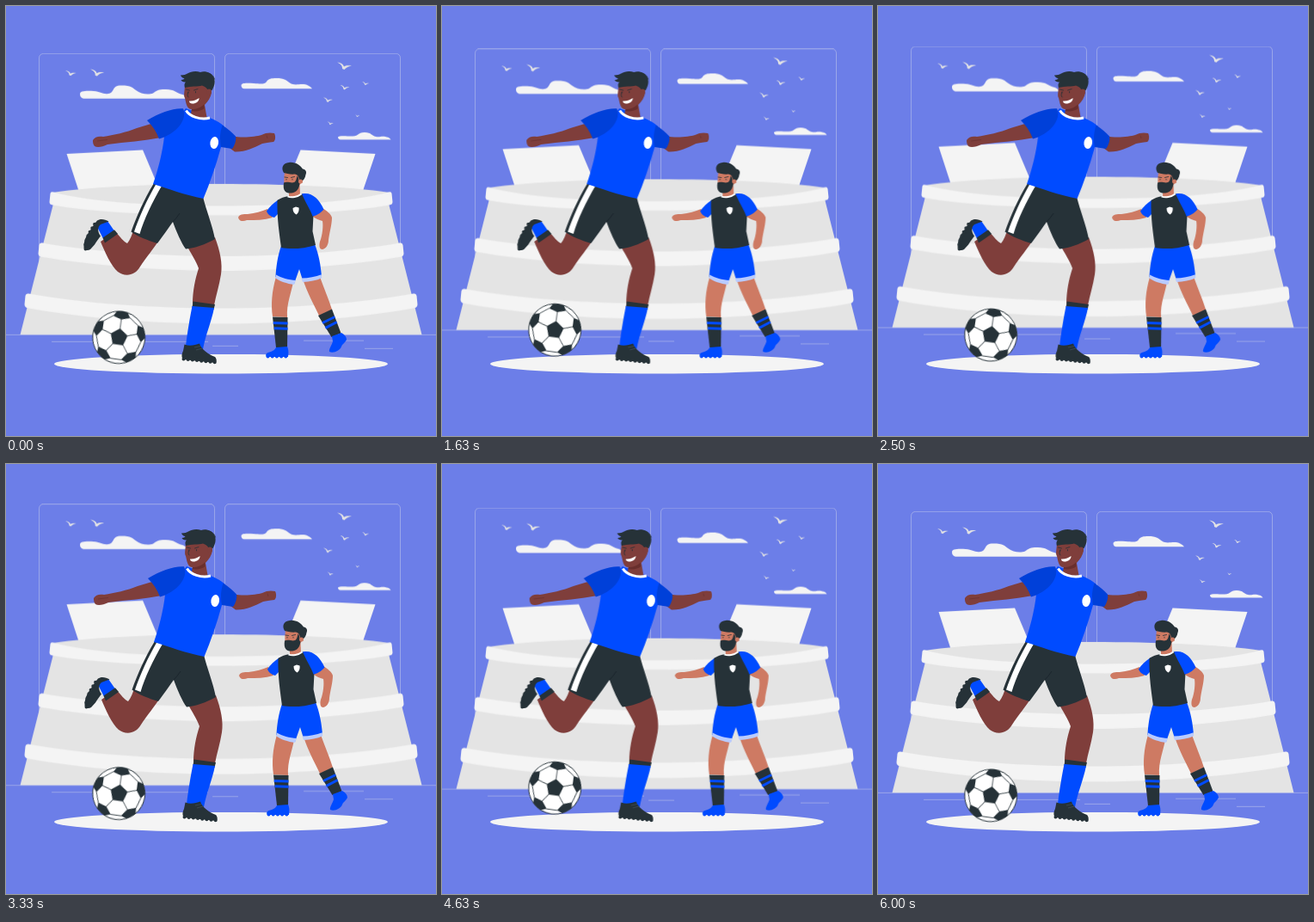
Write an HTML page that moves like this. It is 500x500 px and loops after 6040 ms.

```html
<!DOCTYPE html>
<html lang="en">
<head>
<meta charset="utf-8">
<title>Football match</title>
<style>
  html, body { margin: 0; width: 100%; height: 100%; overflow: hidden; background: #6c7ee8; }
  svg { display: block; width: 100%; height: 100%; }

  .float  { animation: float 6.04s linear infinite; }
  .bounce { animation: bounce 6.04s linear infinite; }
  .shake  { animation: shake 6.04s linear infinite; }

  @keyframes float {
    0%, 100% { transform: translateY(-.13px); }
    49.01%   { transform: translateY(-10px); }
    98.68%   { transform: translateY(0); }
  }
  @keyframes bounce {
    0%, 100%       { transform: translateY(-.27px); }
    24.17%, 73.84% { transform: translateY(-10px); }
    49.01%, 98.68% { transform: translateY(0); }
  }
  @keyframes shake {
    0%, 98.68%, 100%       { transform: translateX(0); }
    9.27%, 88.74%          { transform: translateX(-1px); }
    19.21%, 78.81%         { transform: translateX(2px); }
    29.14%, 49.01%, 68.87% { transform: translateX(-4px); }
    39.07%, 58.94%         { transform: translateX(4px); }
  }

  .white { fill: #fff; }
  .pale  { fill: #f4f4f4; }
  .grey  { fill: #e4e4e4; }
  .ink   { fill: #263238; }
  .blue  { fill: #004bff; }
  .shade { fill: #0040d9; }
  .hem   { fill: #b9cbff; }
  .brown { fill: #7f3e3b; }
  .tan   { fill: #ce7a63; }
  .line  { fill: none; stroke: #ebebeb; stroke-width: .5; stroke-opacity: .75; }
  .studs { fill: none; stroke-width: 4; stroke-linecap: round; stroke-dasharray: 0 5.2; }
  .thin  { fill: none; stroke: #263238; stroke-width: .8; stroke-linecap: round; }
</style>
</head>
<body>
<svg viewBox="0 0 500 500">
  <defs>
    <path id="bird" class="grey" d="M0 0C4 .5 7 2 8 5C10 3.5 13 3.5 17 4C13 5 10.5 6 8.5 8.5C7.5 8 6.5 8 6 7.5C6.3 4 4 2 0 0Z"/>
    <g id="panel">
      <path class="thin" d="M0-10.4V-21M9.95-24.1L19.9-16.9"/>
      <path class="ink" d="M0-21L9.95-24.1L6.1-30L0-30.4L-6.1-30L-9.95-24.1Z"/>
    </g>
  </defs>

  <!-- Sky, stadium and pitch lines -->
  <g class="float">
    <g class="line">
      <rect x="38.5" y="55.4" width="204" height="300" rx="5"/>
      <rect x="254.5" y="55.4" width="204" height="300" rx="5"/>
    </g>
    <g class="pale">
      <path d="M86 103C85.500 98.500 93 98.700 102 99C110 99.500 112 103 119 102C127 101 122 92.500 134 92.500C146 92.500 147 95 151 98C157 103 166 103.500 171 101.500C175 98 179 96.700 186 97C196 97 197 101 205 103C209 104 211 107.700 211 107.700H90C87 107 86 105 86 103Z"/>
      <path d="M273.500 92.500C273.500 89 280 89.500 288 90C297 90.800 301 91 303 88C305 84.500 309 84 314 84C324 84 326 86.500 330 89.500C334 92.500 340 91 344 91C350 91 353 93 356 96.300H277C275 96 273.500 95 273.500 92.500Z"/>
      <path d="M386 152.500C387 150.500 395 151.200 402 151.500C411 152 408 147 417 147C425 147 425 151 430 152C435 153 436 151 441 152C446 153 447 154.500 447.500 155.500H389Q386 155 386 152.500Z"/>
    </g>
    <use href="#bird" transform="translate(69 75) scale(.74)"/>
    <use href="#bird" transform="translate(98 73.500) scale(.95)"/>
    <use href="#bird" transform="translate(385 65.500)"/>
    <use href="#bird" transform="translate(388.500 92) scale(.64)"/>
    <use href="#bird" transform="translate(414 88) scale(.48)"/>
    <use href="#bird" transform="translate(369 106.500) scale(.64)"/>
    <use href="#bird" transform="translate(373.500 134.500) scale(.43)"/>
    <use href="#bird" transform="translate(406 126.500) scale(.3)"/>

    <path class="pale" d="M70.500 172L159 167.400L179 215H84.500ZM342.500 167.400L429.500 172L415 215H323Z"/>
    <path class="grey" d="M54 217C100 210 180 207 250 207S400 210 446 217L445 230L483.500 382.300H16.500L55 230Z"/>
    <g class="pale">
      <path d="M55 216.500C100 229 180 232.500 250 232.500S400 229 445 216.500Q448 215.500 448.500 218L449.500 228Q449.500 231 446 231.500C400 240 320 243.500 250 243.500S100 240 54 231.500Q50.500 231 50.500 228L51.500 218Q52 215.500 55 216.500Z"/>
      <path d="M42 275.500C100 286 180 291 250 291S400 286 458 275.500Q461 275 461.500 278L462.500 288Q462.500 291 459 291.800C400 302 320 308 250 308S100 302 41 291.800Q37.500 291 37.500 288L38.500 278Q39 275 42 275.500Z"/>
      <path d="M26 334.500C90 346 170 351.500 250 351.500S410 346 474 334.500Q477 334 477.500 337L478.500 347Q478.500 350.500 475 351.200C410 363 330 369.500 250 369.500S90 363 25 351.200Q21.500 350.500 21.500 347L22.500 337Q23 334 26 334.500Z"/>
    </g>
    <path class="line" d="M0 382.400H500M53 390.400H235M240 395.400H270M346 389.200H416M417 398.400H450"/>
  </g>

  <ellipse class="pale" cx="250" cy="416.200" rx="194" ry="11.300"/>

  <!-- Ball -->
  <g class="bounce">
    <g transform="translate(131.200 385.600) rotate(8)">
      <circle class="white" r="30.400" stroke="#263238"/>
      <path class="ink" d="M0-10.400L9.900-3.200L6.100 8.400H-6.100L-9.900-3.200Z"/>
      <use href="#panel"/>
      <use href="#panel" transform="rotate(72)"/>
      <use href="#panel" transform="rotate(144)"/>
      <use href="#panel" transform="rotate(216)"/>
      <use href="#panel" transform="rotate(288)"/>
    </g>
  </g>

  <!-- Bearded player -->
  <g class="shake">
    <path class="tan" d="M356 244L368 235C373 238 378 242 379 246C379 254 376 264 375 272C375 278 372 282 368 283C364 283 364 278 365 274C368 266 369 256 368 250C364 249 359 247 356 244Z"/>
    <path class="tan" d="M345 317L365 315C370 329 375 340 379 353L364 360C358 347 350 333 345 317Z"/>
    <path class="ink" d="M363 360L379 352.500L389.500 380.500L378.500 385Z"/>
    <path d="M368 368.500L382.300 361.500M371.500 374.300L384.600 367.500" stroke="#004bff" stroke-width="3"/>
    <path class="blue" d="M379 384L390 380C394 382 396 385 396 388C394 392 391 393 390 396C388 401 381 404 376 402C375 399 379 394 380 390Z"/>
    <path class="tan" d="M314 315L334 320C332 334 326 345 327 362L310 361C308 347 309 332 314 315Z"/>
    <path class="ink" d="M310 361.500L327.500 362L327 398L314 397Z"/>
    <path d="M310.800 368.500L327.500 369M311.800 374.700L327.500 375.200" stroke="#004bff" stroke-width="3"/>
    <path class="blue" d="M314 397L327 396C329 400 328.500 405 328 408H303C301 405 303 403 308 402C311 401 313 399 314 397Z"/>
    <path class="studs" stroke="#004bff" stroke-width="3" d="M304.500 407.500H328"/>
    <path class="blue" d="M320 279L359 277C364 290 366 302 367 314.500C360 318 352 319 345 319L341 306L335 323C327 322 318 319 313.500 315C314 304 316 290 320 279Z"/>
    <path class="hem" d="M314 312.500C320 316 329 318.500 337 319L335 324C327 323 318 320 313.500 316.500ZM343.500 316.500C352 316.500 360 315 366.800 312.300L367.200 316.300C361 319 353 321 345 321Z"/>

    <path class="tan" d="M270 246C271 242 276 242 281 242C290 241 297 239 304 236L310 246C300 249 290 249 280 249C276 251 271 250.500 270 246Z"/>
    <path class="blue" d="M317 225C311 229 306 234 303 238.500C304 242 308 245 312 246L318 240Z"/>
    <path class="ink" d="M329 221L345 218.500L357.500 243L356.500 262L360 278C346 282.500 330 283 320 281C318 265 315 248 315.500 226Q321 222 329 221Z"/>
    <path class="blue" d="M344 218.500C355 216 364 224 369.500 236.500C366 241 360 244 356.500 244.500C354 237 348 228 344 218.500Z"/>
    <path class="white" d="M333.500 235L337 233.500L340.500 234.500C341 239 339.500 241 337.500 242.500C335 241 333.500 239 333.500 235Z"/>

    <path class="tan" d="M324 193L339 194L344 205L341.500 208L342 219C338 223 332 223 329 221L329 216C322 213 323 202 324 193Z"/>
    <path d="M327.500 221.300C332 223.500 339 222 343.500 218.500" fill="none" stroke="#fff" stroke-width="2"/>
    <path class="ink" d="M323 205.500C327 203.500 332 206.500 335 205C338 204 337.500 199 339 197L341.500 206C341 212 338 217 332 217.500C326 218 321.500 216 323 205.500Z"/>
    <path class="ink" d="M323 194C319.500 188 322 182.500 329 182C336 181 342 185 345 189.500C348.500 190 350 193 348.500 196C348 200 346 203 342.500 205L340.500 200C340 197 338 196 336 195.500C331 196 326 195 323 194Z"/>
    <circle class="tan" cx="342.500" cy="204" r="2.500"/>
    <path class="thin" d="M324 199L327.500 199.500M331.500 199.500L335.500 198.500M326 201.300V202M333 201.300V202"/>
  </g>

  <!-- Kicking player -->
  <g class="shake">
    <g class="brown">
      <path d="M148 260L178 272C172 282 163 292 156 303C150 314 138 315 130 309C122 302 115 286 110 274L127 262C132 268 138 275 141 276C144 272 147 266 148 260Z"/>
      <path d="M210 278L243 269C249 285 252 300 250 312C248 325 244 337 242 348L217 346C217 332 220 317 224 305C221 296 215 288 210 278Z"/>
    </g>
    <path class="blue" d="M105 255L118 250L126 261.500L113 270.500Z"/>
    <path class="ink" d="M112.500 269.500L126 260.300L130 265L115 275.500Z"/>
    <path class="ink" d="M119.500 250.500C115 247.500 109 247 106 249.500C102 254 99 260 95 265C92 270 90 275 90.500 281C91 284 95 285 98 283L103 277.500C105 274 107.500 271 110 267.500C106 262 106.500 257 110 254Z"/>
    <path class="studs" stroke="#263238" d="M92.500 282.500C91 274 97 262 105.500 250.500"/>
    <path class="ink" d="M217.500 343.500L243 347L241.500 353L216.500 350.500Z"/>
    <path class="blue" d="M216.500 349L242 351C239 367 232 382 229 399L209 396C211 378 214 362 216.500 349Z"/>
    <path class="ink" d="M207.500 393.500C214 396 220 394 225 392.500C227 399 235 405 243 408C245.500 411 245 414 243.500 415L206 411C203.500 408 204.500 404 206 401Z"/>
    <path class="studs" stroke="#263238" d="M206.500 410.500L243.500 414.300"/>
    <path d="M219 397L226 395.500M221 400L228.500 398" stroke="#46525a" stroke-width=".7"/>

    <path class="ink" d="M172 206L229 222C233 238 240 255 243 271C232 277 219 282 209 282.500C204 276 198 262 194 251C189 258 182 268 176 276C166 273 153 268 145.500 262.500C152 244 161 224 172 206Z"/>
    <path class="white" d="M175 206L181.500 208.500C170 228 160.500 248 155.500 265L149 262.500C155 245 164 225 175 206Z"/>
    <path d="M194 251Q198 247 202 241" fill="none" stroke="#18222a" stroke-width=".8"/>

    <g class="brown">
      <path d="M101 156C103 152 108 151 113 152C125 150 140 147 152 142L172 136L180 153C160 157 140 158 118 161C112 164 106 165 103 163C101 161 101 158 101 156Z"/>
      <path d="M262 151C275 154 290 152 297 150C302 147 308 147 312 148C314 152 313 157 311 158C305 159 302 159 298 160C288 165 278 170 266 169.500L256 162Z"/>
    </g>
    <path d="M106 157L118 155.500M303 150.500L304 154" stroke="#66302e" stroke-width=".6"/>
    <path class="blue" d="M209 119L184 152C182 170 177 190 171 207C188 212 208 220 229.500 224C237 206 244 186 250 164L254 140Q247 134 237 130Z"/>
    <path class="shade" d="M164 133C179 124 194 118.500 206 119.300C210 128 205 143 184 152.500L178 154.500C175 146 170 139 164 133ZM250 164C248 155 249 147 251.500 138.500C258 143 263 147 267 151.500C268 156 266 162 263 166Z"/>
    <ellipse class="white" cx="242.200" cy="159" rx="4.800" ry="7" transform="rotate(8 242 159)"/>

    <path class="brown" d="M208 91C208 99 206 104 208 107C209.500 113 210 120 216 120L215 125C218 131 229 133 233.500 129.500L231 115C235 111 238 106 239 101L236 91Z"/>
    <path d="M209.500 121.500C213 128 226 133 237 130" fill="none" stroke="#fff" stroke-width="3"/>
    <path d="M216 120C222 120 227 118 230 114.500L230.800 119C227 122 221 123 215.600 122Z" fill="#692f2d"/>
    <path class="ink" d="M203 80.500C207 80.500 209 79.500 211 78.500C215 76 221 75.300 226 77C232 75 239 78 241.500 83C244 88 242 94 239.500 98L235 99C234 95 231 93.500 228 92.500C223 94 214 93 208 95C207 92 207.500 90 209 88.500C206.500 89 204 87.500 203.500 86C205.500 86 207 85 207.500 84C205 84 203.500 82 203 80.500Z"/>
    <path class="thin" d="M235 78Q241 79 242.500 85M209.500 97L213.500 98M218.500 98L223 96.500M211.800 100V101.300M220.500 99.500V100.800M212 100Q210 104 212 106"/>
    <circle class="brown" cx="236" cy="99.500" r="3"/>
    <path class="white" d="M213 110.500C217 111 222 109 224.500 107C225 111 220 114 216 113.500C214 113 213 112 213 110.500Z"/>
  </g>
</svg>
</body>
</html>
```
